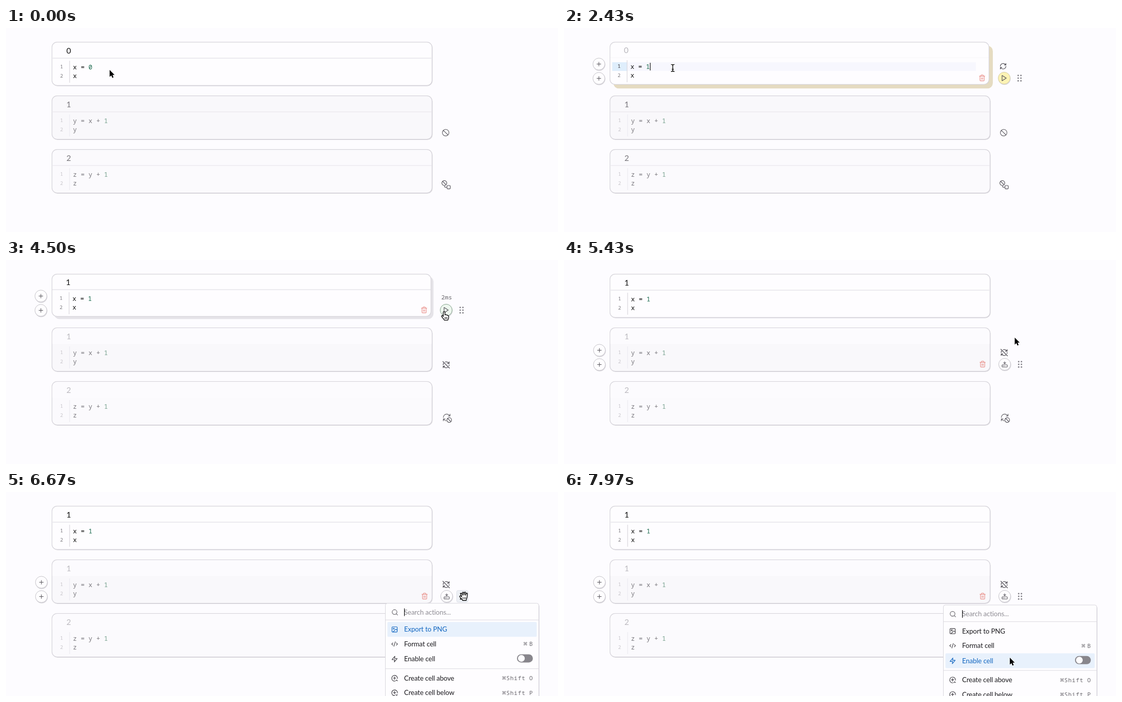
These frames come from a looping animation (1076 by 399 pixels, 8 s). An HTML page:

```html
<!DOCTYPE html>
<html lang="en">
<head>
<meta charset="utf-8">
<title>Notebook cells</title>
<style>
html, body { margin: 0; width: 100%; height: 100%; overflow: hidden; background: #fdfcff; }
svg { display: block; }
text { white-space: pre; }
.code { font: 12.6px "Noto Sans Mono", "DejaVu Sans Mono", monospace; }
.num { font: 9.6px "Noto Sans Mono", "DejaVu Sans Mono", monospace; }
.out { font: 15.5px Lato, "Open Sans", sans-serif; text-anchor: middle; }
.ms { font: 11.6px "Noto Sans Mono", monospace; fill: #66646a; }
.item { font: 13.2px Lato, "Open Sans", sans-serif; letter-spacing: -.1px; }
.key { font: 11px "Noto Sans Mono", monospace; letter-spacing: .85px; fill: #68666c; text-anchor: end; }
.cmd { font: 8.5px "DejaVu Sans", sans-serif; fill: #68666c; }
</style>
</head>
<body>
<svg id="stage" width="1076" height="399" viewBox="0 0 1076 399"></svg>
<script>
const LOOP = 8000, RUN = 3960, LEAVE = 5300, EDIT = 1830;

const icons = {
  plus: 'M5 12h14M12 5v14',
  play: 'M5 3l14 9-14 9z',
  trash: 'M3 6h18M19 6v14c0 1-1 2-2 2H7c-1 0-2-1-2-2V6M8 6V4c0-1 1-2 2-2h4c1 0 2 1 2 2v2M10 11v6M14 11v6',
  refresh: 'M3 12a9 9 0 0 1 9-9 9.75 9.75 0 0 1 6.74 2.74L21 8M21 3v5h-5M21 12a9 9 0 0 1-9 9 9.75 9.75 0 0 1-6.74-2.74L3 16M8 16H3v5',
  refreshOff: 'M21 8l-2.26-2.26A9.75 9.75 0 0 0 12 3c-1 0-1.97.16-2.87.47M8 16H3v5M3 12c0-2.49 1-4.74 2.64-6.36M3 16l2.26 2.26A9.75 9.75 0 0 0 12 21c2.49 0 4.74-1 6.36-2.64M21 12c0 1-.16 1.97-.47 2.87M21 3v5h-5M22 22L2 2',
  ban: 'M2 12a10 10 0 0 1 20 0a10 10 0 0 1-20 0M4.9 4.9l14.2 14.2',
  save: 'M12 2v8M16 6l-4 4-4-4M4 14h16a2 2 0 0 1 2 2v4a2 2 0 0 1-2 2H4a2 2 0 0 1-2-2v-4a2 2 0 0 1 2-2zM6 18h.01M10 18h.01',
  search: 'M3 11a8 8 0 0 1 16 0a8 8 0 0 1-16 0M21 21l-4.3-4.3',
  image: 'M5 3h14a2 2 0 0 1 2 2v14a2 2 0 0 1-2 2H5a2 2 0 0 1-2-2V5a2 2 0 0 1 2-2zM7 9a2 2 0 0 1 4 0a2 2 0 0 1-4 0M21 15l-3.1-3.1a2 2 0 0 0-2.8 0L6 21',
  code: 'M18 16l4-4-4-4M6 8l-4 4 4 4M14.5 4l-5 16',
  zap: 'M13 2L3 14h9l-1 8 10-12h-9z',
  above: 'M13 21.9A10 10 0 1 1 21.9 13M12 7v9M7.5 11.5h9M16 21l3-3 3 3',
  below: 'M13 21.9A10 10 0 1 1 21.9 13M12 7v9M7.5 11.5h9M16 18l3 3 3-3'
};

const icon = (name, x, y, size, color = '#55535a', width = 2) =>
  `<path d="${icons[name]}" transform="translate(${x - size / 2} ${y - size / 2}) scale(${size / 24})"
    fill="none" stroke="${color}" stroke-width="${width}" stroke-linecap="round" stroke-linejoin="round"/>`;
const text = (cls, x, y, s, fill = '', extra = '') =>
  `<text class="${cls}" x="${x}" y="${y}" ${fill && `fill="${fill}"`} ${extra}>${s}</text>`;
const rect = (x, y, w, h, fill, extra = '') =>
  `<rect x="${x}" y="${y}" width="${w}" height="${h}" fill="${fill}" ${extra}/>`;
// Visible only from a up to b
const during = (a, b, body) => `<g data-on="${a} ${b}">${body}</g>`;
const shift = (x, y, body) => `<g transform="translate(${x} ${y})">${body}</g>`;

const disc = (x, y, fill = '#fefdff', line = '#c6c4ca') =>
  `<circle cx="${x + .6}" cy="${y + 1.3}" r="12" fill="#d9d7dd"/>
   <circle cx="${x}" cy="${y}" r="11.6" fill="${fill}" stroke="${line}"/>`;
const dots = color => [0, 1, 2, 3, 4, 5].map(i =>
  `<circle cx="${886.3 + i % 2 * 5.4}" cy="${93.7 + (i >> 1) * 5.3}" r="1.5" fill="${color}"/>`).join('');

const controls = run =>
  [71.5, 99.5].map(y => disc(69, y) + icon('plus', 69, y, 13)).join('') +
  icon('trash', 816, 98.6, 14, '#e9908a') + run + dots('#85838a');

const number = (s, color) => `<tspan fill="${color}">${s}</tspan>`;
const lines = (first, second, ink, dim, rule) =>
  rect(123.4, 64, 1.2, 43, rule) +
  text('num', 105.6, 79, 1, dim) + text('num', 105.6, 97, 2, dim) +
  text('code', 130.6, 80.7, first, ink) + text('code', 130.6, 98, second, ink);

function idleCell(i, name, from, fill) {
  const digit = color => text('out', 122.3, 50, i, color);
  return shift(0, i * 105,
    rect(90, 28, 741.6, 86, '#d9d7dd', 'rx="10.5"') +
    rect(89.6, 27.6, 740.8, 85, fill, 'rx="10" stroke="#d6d4da" stroke-width="1.2"') +
    during(0, RUN, rect(91, 58.5, 738.5, 1, '#e6e4ea') + digit('#77757b')) +
    during(RUN, LOOP, `<path d="M90.3 59V38a9.7 9.7 0 0 1 9.7-9.7h720a9.7 9.7 0 0 1 9.7 9.7v21z" fill="#fcfbfe"/>` + digit('#bcbac0')) +
    lines(`${name} = ${from} + ${number(1, '#76a08e')}`, name, '#7b797f', '#c6c4ca', '#ecebf0'));
}

const topCell =
  rect(0, 0, 0, 0, '#ddd', 'id="shadow" rx="10.5"') +
  rect(89.6, 27.6, 0, 0, '#fefdff', 'id="card" rx="10" stroke="#d6d4da" stroke-width="1.2"') +
  '<g id="inner">' +
  during(540, 3840, rect(95, 68, 29, 17, '#dfeefc') + rect(124.5, 68, 679.5, 17, '#f7f7fe')) +
  rect(91, 58.5, 738, 1, '#dcdae0', 'id="rule"') +
  '<text class="out" x="122.3" y="50" id="result"></text>' +
  lines('x = <tspan id="value" fill="#17674b"></tspan>', 'x', '#111', '#77757b', '#d9d7dd') +
  during(540, 3840, text('num', 105.6, 79, 1, '#55535a')) +
  '<rect id="caret" y="69" width="1.2" height="15" fill="#111"/>' +
  during(60, LEAVE, controls(
    during(0, EDIT, disc(859, 99) + text('ms', 849.5, 78.3, '3ms')) +
    during(EDIT, RUN, disc(859, 99, '#fdf3b4', '#d5cda4') + icon('refresh', 857, 75.8, 14.5)) +
    during(RUN, LOOP, disc(859, 99, '#eef7ef', '#83a38b') + text('ms', 849.5, 78.3, '2ms')) +
    icon('play', 859, 99, 14))) +
  '</g>';

const linked = icon('ban', 854.4, 303.2, 11.5, '#55535a', 2.5) +
  '<path d="M855 308.5v1a2 2 0 0 0 2 2h2.5M861 308h3.6a1.4 1.4 0 0 1 1.4 1.4v3.8a1.4 1.4 0 0 1-1.4 1.4H861a1.4 1.4 0 0 1-1.4-1.4v-3.8a1.4 1.4 0 0 1 1.4-1.4z" fill="none" stroke="#55535a" stroke-width="1.2"/>';
const staleLinked = icon('refresh', 859, 308, 17.5, '#66646a', 1.6) +
  '<circle cx="864" cy="313" r="5.8" fill="#fdfcff"/>' + icon('ban', 864, 313, 11, '#55535a', 2.4);

const status =
  during(0, RUN, icon('ban', 857, 204.7, 15.5, '#66646a', 1.8) + linked) +
  during(RUN, LEAVE, icon('refreshOff', 858, 205, 15.5)) +
  during(LEAVE, LOOP, icon('refreshOff', 858, 181, 15.5)) +
  during(RUN, LOOP, staleLinked) +
  during(LEAVE, LOOP, shift(0, 105, controls(disc(859, 99) + icon('save', 859, 99, 12.5)))) +
  during(5720, 6960, rect(878.5, 192.5, 22, 23, '#edf0f5', 'rx="3" stroke="#dfe1e8"') + shift(0, 105, dots('#333')));

// Row: icon, label, centre, shortcut, then the time it is highlighted
const rows = [
  ['image', 'Export to PNG', 51.7, '', 0, 7180],
  ['code', 'Format cell', 80.2, 'B', 7180, 7620],
  ['zap', 'Enable cell', 109.7, '', 7620, LOOP],
  ['above', 'Create cell above', 147.2, 'Shift O'],
  ['below', 'Create cell below', 175.6, 'Shift P']
];
const row = ([name, label, y, key, a, b]) => {
  const face = (ink, line) => icon(name, 757.5, y, 13.5, line) + text('item', 776, y + 4.6, label, ink);
  const lit = a === undefined ? '' : during(a, b,
    rect(743.5, y - 14.7, 291, 29, '#e8f1fc', 'rx="2"') + face('#1266c0', '#1266c0'));
  return face('#1b1a1e', '#3c3a40') + lit + (key && text('key', 1027.5, y + 4, key) +
    text('cmd', key === 'B' ? 1008 : 966.5, y + 3, '⌘'));
};
const menu = '<g id="menu">' +
  rect(740.5, 2, 299.5, 240, '#e3e1e7', 'rx="5"') +
  rect(739.5, .5, 299, 240, '#fefdff', 'rx="4" stroke="#d9d7dd"') +
  icon('search', 758, 18.3, 14, '#66646a') + text('item', 776, 22.9, 'Search actions...', '#8e8c93') +
  '<rect id="blink" x="776" y="10.5" width="1.2" height="15" fill="#111"/>' +
  rect(740, 32.6, 298, 1, '#dcdae0') + rows.map(row).join('') +
  rect(996, 100.3, 31, 16, '#88868c', 'rx="8"') +
  '<circle cx="1004.6" cy="108.3" r="6.6" fill="#fefdff"/>' +
  rect(740, 128, 298, 1, '#dcdae0') + '</g>';

const arrow = '<path d="M0 0V13.6L3.2 10.7 5.2 15.4 7.6 14.4 5.6 9.8H9.6z" fill="#000" stroke="#fff" stroke-width="1" paint-order="stroke"/>';
const beamPath = 'M-3.4-6.6C-1.5-6.6 0-6.4 0-5 0-6.4 1.5-6.6 3.4-6.6M0-5V5.6M-3.4 7C-1.5 7 0 6.8 0 5.4 0 6.8 1.5 7 3.4 7M-2 2.6H2';
const beam = ['#fff" stroke-width="3', '#000" stroke-width="1.4']
  .map(s => `<path d="${beamPath}" fill="none" stroke="${s}"/>`).join('');
const handStyle = 'fill="#fff" stroke="#000" stroke-width="1.3" stroke-linejoin="round"';
const pointer = `<path d="M-1.6 1.4a1.6 1.6 0 0 1 3.2 0V6.4c.5-1 2.5-.9 2.9.3.8-.6 2.2-.2 2.4.9 1-.4 1.9.2 1.9 1.4V12c0 2-1.4 2.4-1.4 4.6H.2C.2 14.6-3.4 12-4.8 9.6-5.6 8-3.8 7-2.6 8.4L-1.6 9.6z" ${handStyle}/><path d="M1.6 11v3M3.6 11v3M5.6 11v3" stroke="#000"/>`;
const grab = `<path d="M-3.6 1L-5.4-4a1.3 1.3 0 0 1 2.5-.9L-1.8-2-2.3-6.7a1.3 1.3 0 0 1 2.6-.2L.9-2.5 1.4-7.2a1.3 1.3 0 0 1 2.6.2L3.8-2 5-5.2a1.3 1.3 0 0 1 2.5.8C6.8-1 7.4 2 5.6 4.8L5.2 8H-2C-3 5-6 3.4-7.6 1-8.4-.6-6.6-1.6-5.4-.4z" ${handStyle}/><path d="M-1.3 2v3M1.3 2v3M3.7 2v3" stroke="#000"/>`;
const cursor = '<g id="cursor">' +
  during(0, 110, arrow) + during(110, 3010, beam) + during(3010, 3500, arrow) +
  during(3500, 5090, pointer) + during(5090, 5720, arrow) + during(5720, 6960, grab) +
  during(6960, LOOP, arrow) + '</g>';

const path = [
  [30, 202, 82], [420, 216, 76], [800, 212, 78], [2430, 212, 78], [2830, 470, 66], [2970, 470, 66],
  [3230, 835, 89], [3520, 851, 103], [3770, 854, 101], [4970, 854, 101], [5300, 868, 124],
  [5620, 897, 200], [5770, 893, 203], [6300, 893, 203], [6600, 892, 204], [6800, 892, 204],
  [7100, 872, 262], [7430, 864, 306], [7560, 864, 308], [7900, 869, 324], [8000, 869, 324]
];

const $ = id => document.getElementById(id);
$('stage').innerHTML = topCell + idleCell(1, 'y', 'x', '#f9f8fb') + idleCell(2, 'z', 'y', '#fbfafd') +
  status + menu + cursor;

const timed = [...document.querySelectorAll('[data-on]')].map(el => [el, ...el.dataset.on.split(' ').map(Number)]);
const smooth = p => p * p * (3 - 2 * p);
const ramp = (t, a, b) => smooth(Math.min(1, Math.max(0, (t - a) / (b - a))));
const mix = (a, b, p) => `rgb(${a.map((v, i) => v + (b[i] - v) * p)})`;
const set = (id, attrs) => { for (const k in attrs) $(id).setAttribute(k, attrs[k]); };

function pointerAt(t) {
  const i = path.findIndex(p => p[0] > t);
  if (i < 1) return path[i < 0 ? path.length - 1 : 0].slice(1);
  const [a, x, y] = path[i - 1], [b, u, v] = path[i], p = ramp(t, a, b);
  return [x + (u - x) * p, y + (v - y) * p];
}

function draw(t) {
  for (const [el, a, b] of timed) el.style.display = t >= a && t < b ? '' : 'none';

  const focus = ramp(t, 440, 560) - ramp(t, LEAVE, LEAVE + 90);
  const stale = ramp(t, EDIT, 2050) - ramp(t, RUN, 4150);
  const off = 1 + focus * 3.7 + stale * 2.6;
  const w = 742 - focus * 2, h = 86 - focus * 2;
  set('shadow', { x: 89 + off, y: 27 + off * 1.05, width: w - .4, height: h - .4,
    fill: mix([217 + focus * 12, 215 + focus * 12, 221 + focus * 11], [229, 219, 193], stale) });
  set('card', { width: w - 1.2, height: h - 1.2 });
  set('inner', { transform: `translate(${-focus} ${-focus})` });
  set('rule', { opacity: 1 - stale * .8 });
  set('result', { fill: mix([17, 17, 17], [184, 182, 188], stale) });
  $('result').textContent = t < RUN ? 0 : 1;
  $('value').textContent = t < EDIT ? 0 : t < 2100 ? '' : 1;

  const typing = t > 1800 && t < 2640;
  set('caret', { x: t >= EDIT && t < 2100 ? 161 : 168.5,
    opacity: typing || (t > 540 && t < 1270) ? 1 : t < 1400 && t > 1000 ? 1 - ramp(t, 1270, 1390) : 0 });

  const open = ramp(t, 6570, 6830);
  set('menu', { transform: `translate(0 ${220.5 - 8 * (1 - Math.sqrt(open))})`, opacity: Math.min(1, open * 4) });
  set('blink', { opacity: t > 7100 && t < 7600 ? 0 : 1 });
  set('cursor', { transform: `translate(${pointerAt(t)})` });
}

function tick(now) {
  draw(now % LOOP);
  requestAnimationFrame(tick);
}
draw(0);
requestAnimationFrame(tick);
</script>
</body>
</html>
```
